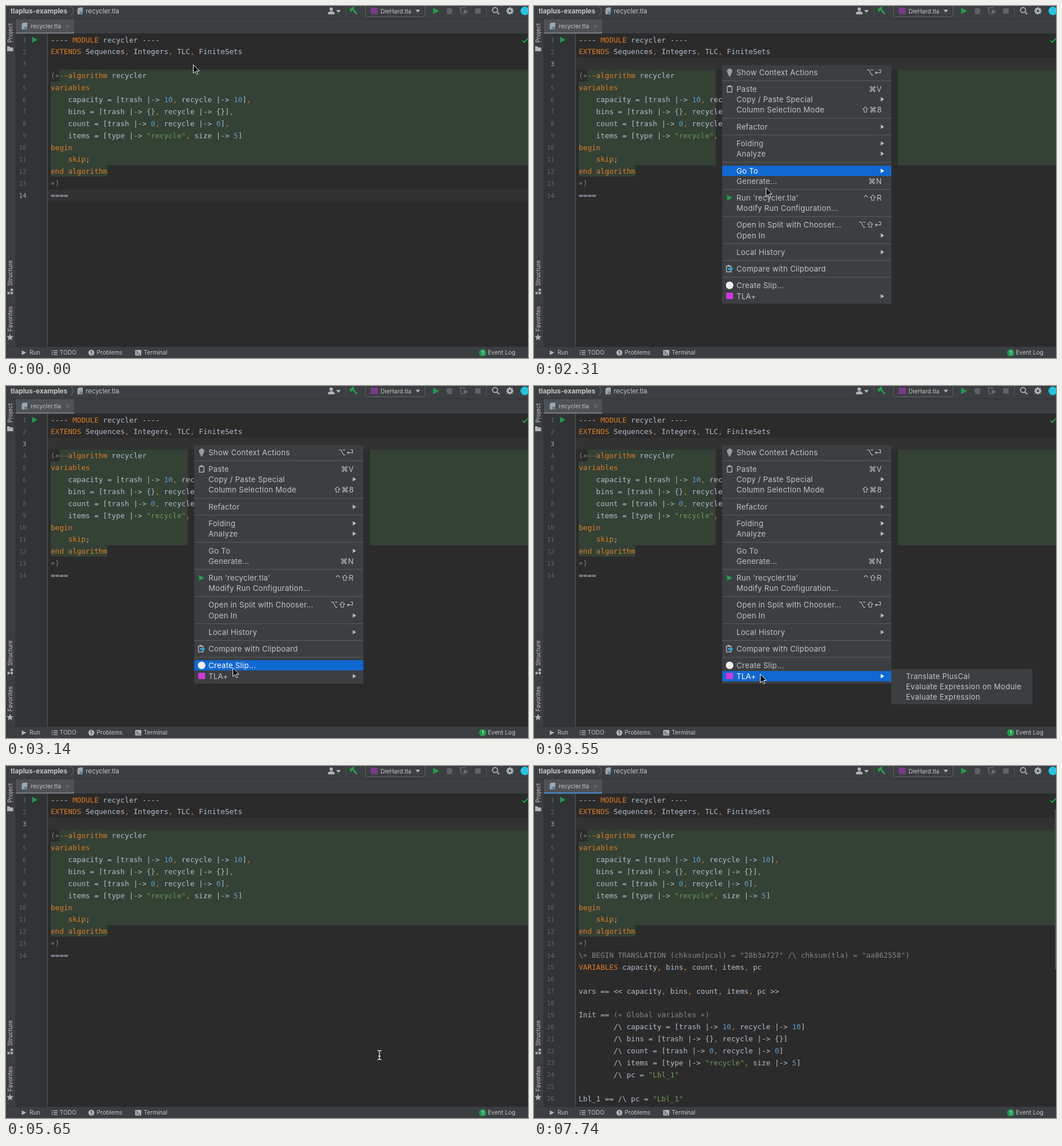
Write an HTML page that moves like this. It is 910 px wide and 615 px high and loops after 7840 ms.

```html
<!DOCTYPE html>
<html lang="en">
<head>
<meta charset="utf-8">
<title>Editor menu</title>
<style>
html, body { margin: 0; width: 100%; height: 100%; overflow: hidden; background: #2b2b2b; }
svg { display: block; width: 910px; height: 615px; }
text { white-space: pre; }
.ui { font: 10.2px Inter, "Open Sans", sans-serif; fill: #c3c5c6; }
.menu { font: 13px Inter, "DejaVu Sans", sans-serif; letter-spacing: .31px; fill: #c3c4c5; }
.code { font: 12.61px "DejaVu Sans Mono", "Noto Sans Mono", monospace; fill: #b0bdcb; }
.number { font: 10.8px "DejaVu Sans Mono", "Noto Sans Mono", monospace; fill: #63676a; text-anchor: end; }
.number.on { fill: #b0b0b0; }
.kw { fill: #db7c28; } .num { fill: #5f9ac6; } .str { fill: #6a9955; } .com { fill: #858585; }
.on { fill: #fff; }
</style>
</head>
<body>
<svg id="stage" viewBox="0 0 910 615"></svg>
<script>
const LOOP = 7840, LINE = 20.88, TOP = 48.5;
const ROW = 18.15, GAP = 11.15;
const MENU = { x: 328, right: 623, top: 103.5, bottom: 520 };
const ICON = '#b1b4b6', GREEN = '#1f9e4c', PANEL = '#3c3f41';

const spec = String.raw`---- MODULE recycler ----
EXTENDS Sequences, Integers, TLC, FiniteSets

(*--algorithm recycler
variables
    capacity = [trash |-> 10, recycle |-> 10],
    bins = [trash |-> {}, recycle |-> {}],
    count = [trash |-> 0, recycle |-> 0],
    items = [type |-> "recycle", size |-> 5]
begin
    skip;
end algorithm
*)`.split('\n');

const translation = String.raw`\* BEGIN TRANSLATION (chksum(pcal) = "28b3a727" /\ chksum(tla) = "aa862558")
VARIABLES capacity, bins, count, items, pc

vars == << capacity, bins, count, items, pc >>

Init == (* Global variables *)
        /\ capacity = [trash |-> 10, recycle |-> 10]
        /\ bins = [trash |-> {}, recycle |-> {}]
        /\ count = [trash |-> 0, recycle |-> 0]
        /\ items = [type |-> "recycle", size |-> 5]
        /\ pc = "Lbl_1"

Lbl_1 == /\ pc = "Lbl_1"`.split('\n');

// '-' separates groups; each item is label | shortcut ('>' opens a submenu) | icon
const menuSpec = ['Show Context Actions|⌥⏎|bulb', '-', 'Paste|⌘V|paste', 'Copy / Paste Special|>',
  'Column Selection Mode|⇧⌘8', '-', 'Refactor|>', '-', 'Folding|>', 'Analyze|>', '-', 'Go To|>',
  'Generate...|⌘N', '-', "Run 'recycler.tla'|⌃⇧R|run", 'Modify Run Configuration...', '-',
  'Open in Split with Chooser...|⌥⇧⏎', 'Open In|>', '-', 'Local History|>', '-',
  'Compare with Clipboard||compare', '-', 'Create Slip...||disc', 'TLA+|>|square'];

// start time, pointer kind, x, y, highlighted menu label
const pointerSteps = [
  [0, 'arrow', 326, 102], [1890, 'arrow', 328, 106], [2100, 'arrow', 360, 171, 'Paste'],
  [2310, 'arrow', 404, 317, 'Go To'], [2510, 'arrow', 403, 378, 'Open in Split with Chooser...'],
  [2720, 'arrow', 400, 435, 'Local History'], [2930, 'arrow', 397, 475],
  [3140, 'arrow', 395, 492, 'Create Slip...'], [3340, 'arrow', 394, 499, 'TLA+'],
  [3550, 'arrow', 394, 503, 'TLA+'], [4180, 'arrow', 426, 503, 'TLA+'], [4390, 'arrow', 518, 508, 'TLA+'],
  [4600, 'arrow', 571, 508, 'TLA+'], [4810, 'arrow', 624, 503, 'TLA+'], [5020, 'arrow', 650, 502, 'TLA+'],
  [5650, 'beam', 651, 505], [6900, 'beam', 652, 505], [7110, 'arrow', 798, 587],
  [7320, 'arrow', 873, 612], [7530, 'none', 0, 0]
];

const escape = s => s.replace(/&/g, '&amp;').replace(/</g, '&lt;').replace(/>/g, '&gt;');
const rect = (x, y, w, h, fill, more = '') =>
  `<rect x="${x}" y="${y}" width="${w}" height="${h}" fill="${fill}" ${more}/>`;
const circle = (x, y, r, fill) => `<circle cx="${x}" cy="${y}" r="${r}" fill="${fill}"/>`;
const shape = (d, fill) => `<path d="${d}" fill="${fill}"/>`;
const stroke = (d, color, width = 1) => `<path d="${d}" fill="none" stroke="${color}" stroke-width="${width}"/>`;
const text = (x, y, s, cls = 'ui', more = '') => `<text x="${x}" y="${y}" class="${cls}" ${more}>${escape(s)}</text>`;
const group = (id, body) => `<g id="${id}">${body}</g>`;
const play = (x, y, h, fill) => shape(`M${x} ${y - h}l${h * 1.8} ${h}l${-h * 1.8} ${h}z`, fill);
const drop = (x, y) => shape(`M${x - 4} ${y - 2}h8l-4 5z`, ICON);

function highlight(line) {
  const token = /(\\\*.*|\(\*(?: .*\*\))?|\*\))|("[^"]*")|(--algorithm|end algorithm|\b(?:MODULE|EXTENDS|VARIABLES|variables|begin|skip)\b|,)|(\b\d+\b)/g;
  const kinds = ['com', 'str', 'kw', 'num'];
  let html = '', last = 0;
  for (const m of line.matchAll(token)) {
    const kind = kinds[m.slice(1).findIndex(Boolean)];
    html += escape(line.slice(last, m.index)) + `<tspan class="${kind}">${escape(m[0])}</tspan>`;
    last = m.index + m[0].length;
  }
  // the editor font centres its asterisk on the line
  return (html + escape(line.slice(last))).replace(/\*/g, '∗');
}

const lineY = n => TOP + LINE * (n - 1);
const codeLine = (line, n) =>
  `<text x="78" y="${lineY(n) + 15.1}" class="code">${highlight(line)}</text>` +
  text(35.5, lineY(n) + 14.6, String(n), 'number', `id="n${n}"`);
const codeBlock = (lines, first) => lines.map((line, i) => codeLine(line, first + i)).join('');

function fileIcon(x, y) {
  return shape(`M${x + 4} ${y}h5.5v12h-9.5v-8z`, '#9aa7b0') + shape(`M${x} ${y + 3}l3-3v3z`, '#c4ccd1') +
    rect(x + 4, y + 7, 5.5, 5, '#64808f');
}

function gear(x, y) {
  let teeth = '';
  for (let i = 0; i < 8; i++) teeth += rect(x - 1.4, y - 6.3, 2.8, 3, ICON, `transform="rotate(${i * 45} ${x} ${y})"`);
  return teeth + `<circle cx="${x}" cy="${y}" r="3.3" fill="none" stroke="${ICON}" stroke-width="2.6"/>`;
}

function star(x, y, r) {
  const points = Array.from({ length: 10 }, (_, i) => {
    const a = i * Math.PI / 5 - Math.PI / 2, d = i % 2 ? r * .42 : r;
    return `${x + d * Math.cos(a)},${y + d * Math.sin(a)}`;
  });
  return `<polygon points="${points.join(' ')}" fill="${ICON}"/>`;
}

function bug(x, y) {
  return stroke(`M${x - 5.5} ${y}h11M${x - 5} ${y - 4}l3 2M${x + 5} ${y - 4}l-3 2M${x - 5} ${y + 5}l3-2M${x + 5} ${y + 5}l-3-2`, '#686b6d', 1.3) +
    `<ellipse cx="${x}" cy="${y + .5}" rx="3.8" ry="5.5" fill="#686b6d"/>` + stroke(`M${x - 2} ${y - 1}h4m-4 3h4`, PANEL);
}

function toolbar() {
  return rect(0, 0, 910, 48, PANEL) + rect(0, 22, 910, 1, '#313335') +
    text(8, 12.8, 'tlaplus-examples', 'ui', 'style="font-size:11.7px;font-weight:700"') +
    stroke('M114 1l4 7.5-4 7.5', '#777a7c') + fileIcon(124.5, 2.5) +
    text(139, 12.7, 'recycler.tla', 'ui', 'style="font-size:11.3px"') +
    circle(567, 5.5, 3, ICON) + shape('M561 14.5v-2q1-3 6-3.5q5 .5 6 3.5v2z', ICON) + drop(579.5, 9) +
    rect(592, 0, 1, 18, '#515456') +
    `<g transform="rotate(-43 607 9)">${rect(605.7, 3, 2.8, 13, GREEN)}${rect(602, 1.5, 9, 4.5, GREEN)}</g>` +
    rect(626.5, -5, 104, 23.5, PANEL, 'rx="3" stroke="#5f6264"') +
    rect(636, 3, 12, 11, '#7a3a8c') + text(653, 12.7, 'DieHard.tla') + drop(718, 8.5) +
    play(744.5, 8.5, 5.8, GREEN) + bug(773, 8.5) +
    stroke('M801 3h-8.5v6q1 4 5 5.5', '#686b6d', 1.6) + play(798, 10, 4.5, '#686b6d') +
    rect(818, 4, 9.5, 9.5, '#606365') + rect(837, 0, 1, 18, '#515456') +
    `<circle cx="852.5" cy="7" r="4.4" fill="none" stroke="${ICON}" stroke-width="1.7"/>` +
    stroke('M856 10.5l4 4', ICON, 2) + gear(878.5, 8.5) + circle(904.5, 8.5, 7.5, '#20c5e5') +
    rect(17, 23, 101.5, 25, '#4e5254') + fileIcon(27.5, 29) + text(43, 38.8, 'recycler.tla') +
    stroke('M104.5 32.5l5.5 5.5m0-5.5l-5.5 5.5', '#7f8385') +
    rect(17, 46, 101.5, 2.3, '#747a80', 'id="tabLine"');
}

function sideBar() {
  const label = (y, s) => text(0, 0, s, 'ui', `text-anchor="middle" transform="translate(10.7 ${y}) rotate(-90)"`);
  return rect(0, 23, 16, 573, PANEL) + rect(16, 23, 1, 573, '#323232') +
    label(47, 'Project') + shape('M2 70.5h4l1.5 2h5v6.5h-10.5z', ICON) +
    label(466.5, 'Structure') + rect(2.5, 499.5, 4, 4, ICON) + rect(8, 499.5, 4, 4, ICON) + rect(8, 494, 4, 4, ICON) +
    label(546.5, 'Favorites') + star(7, 579, 6.3);
}

function statusBar() {
  return rect(0, 595, 910, 20, PANEL) + rect(0, 595, 910, 1, '#323435') +
    play(27.5, 605.8, 4.3, ICON) + text(41, 609.3, 'Run') +
    stroke('M83 602.5h7m-7 3.3h7m-7 3.3h7M79.5 602.5h2m-2 3.3h2m-2 3.3h2', ICON, 1.4) + text(93.5, 609.3, 'TODO') +
    circle(148.8, 605.8, 5.2, ICON) + stroke('M148.8 602.5v4m0 1.2v1.6', PANEL, 1.5) + text(158, 609.3, 'Problems') +
    rect(225.3, 601, 10.6, 9.5, ICON) + stroke('M227.5 603.3l2.5 2.4-2.5 2.4m3.5 0h3', PANEL, 1.2) + text(240, 609.3, 'Terminal') +
    circle(831, 605.8, 6.2, GREEN) + text(831, 609.2, '1', 'on', 'style="font:9px Inter,sans-serif" text-anchor="middle"') +
    text(840, 609.3, 'Event Log');
}

const clipboard = (x, y) => stroke(`M${x} ${y - 4.5}h8v10h-8z`, ICON, 1.4) + rect(x + 2, y - 6.5, 4, 3, ICON);
const menuIcons = {
  bulb: y => circle(341, y - 2, 4.7, '#9a9da0') + rect(338.5, y + 1, 5, 4, '#9a9da0') + rect(339, y + 5.5, 4, 1.3, '#9a9da0'),
  paste: y => clipboard(337, y),
  run: y => play(336.5, y, 5.3, GREEN),
  compare: y => clipboard(335.5, y) + shape(`M338 ${y - 1}h4v-3l5.5 4.5-5.5 4.5v-3h-4z`, '#35a4d8'),
  disc: y => circle(341, y, 6.6, '#f0f0f0'),
  square: y => rect(335, y - 6, 12, 11, '#cf37dc')
};

const rows = [];
function buildMenu() {
  const { x, right, top, bottom } = MENU;
  let offset = 115.88 - ROW, lines = '', items = '';
  for (const entry of menuSpec) {
    if (entry === '-') {
      lines += rect(x, offset + 14.1, right - x, 1.2, '#56595b');
      offset += GAP;
      continue;
    }
    offset += ROW;
    const y = Math.round(offset);
    const [label, key, icon] = entry.split('|');
    rows.push({ label, y });
    const side = key === '>' ? shape(`M604.5 ${y - 3.7}l6 3.7-6 3.7z`, 'currentColor')
      : key ? text(606.3, y + 5, key, 'menu', 'text-anchor="end"') : '';
    items += `<g class="row" color="#b8babb">${text(353, y + 5, label, 'menu')}${side}${icon ? menuIcons[icon](y) : ''}</g>`;
  }
  return rect(x, top, right - x, bottom - top, PANEL) + lines +
    rect(x, 0, right - x, 18, '#1068d1', 'id="hover"') + items;
}

function buildSubmenu() {
  const labels = ['Translate PlusCal', 'Evaluate Expression on Module', 'Evaluate Expression'];
  return rect(623, 494.5, 246, 61.5, PANEL) + rect(623, 498, 246, 18, '#1068d1', 'id="subHover"') +
    labels.map((s, i) => text(648.5, 512 + 18 * i, s, 'menu', `id="sub${i}"`)).join('');
}

const block = '#344135';
const stage = document.getElementById('stage');
stage.innerHTML =
  rect(0, 0, 910, 615, '#2b2b2b') + rect(17, 48, 55, 548, '#313335') +
  rect(73, 0, 837, LINE - 1, '#323232', 'id="currentLine"') +
  rect(93.2, lineY(4), 816.8, LINE + .1, block) + rect(78, lineY(5), 832, LINE * 7, block) +
  rect(78, lineY(12), 98.7, LINE - 1, block) +
  rect(317, lineY(4), 317, LINE * 8, '#2b2c2b', 'id="shade"') +
  rect(72, 48, 1, 548, '#555759') + play(45.5, 59, 5.2, GREEN) +
  codeBlock(spec, 1) + group('ending', codeLine('====', 14)) +
  group('translated', codeBlock(translation, 14).replace('id="n14"', '') + rect(908, 76, 2, 279, '#505152')) +
  rect(78, 92, 1.7, 17, '#bbbbbb', 'id="caret"') +
  group('check', stroke('M900.5 60.5l3 3 6-6.5', GREEN, 2.2)) +
  group('eye', stroke('M900 60.5q5-6 10 0q-5 6-10 0z', ICON) + circle(905, 60.5, 1.6, ICON)) +
  toolbar() + sideBar() + statusBar() +
  group('menu', buildMenu()) + group('submenu', buildSubmenu()) +
  group('arrow', '<path d="M.5 .5v15l3.5-3.3 2.4 5.5 2.3-1-2.4-5.3h4.7z" fill="#080808" stroke="#f2f2f2"/>') +
  group('beam', stroke('M-3.5-8q3 0 3.5 1.5q.5-1.5 3.5-1.5M0-7v14M-3.5 8q3 0 3.5-1.5q.5 1.5 3.5 1.5M-2 2h4', '#e6e6e6', 1.4));

const part = id => document.getElementById(id);
const show = (id, on) => part(id).setAttribute('display', on ? 'inline' : 'none');
const rowNodes = [...stage.querySelectorAll('.row')];

function render(t) {
  const within = (from, to = LOOP) => t >= from && t < to;
  const [, kind, x, y, active] = pointerSteps.findLast(step => step[0] <= t);
  const open = within(1260, 5650), translated = t >= 5850, picking = within(5020, 5650);

  for (const id of ['menu', 'shade']) show(id, open);
  show('submenu', within(3550, 5650));
  show('subHover', picking);
  part('sub0').style.fill = picking ? '#fff' : '';
  show('hover', active);
  rows.forEach((row, i) => {
    const on = row.label === active;
    if (on) part('hover').setAttribute('y', row.y - 9);
    rowNodes[i].setAttribute('color', on ? '#fff' : '#b8babb');
    rowNodes[i].querySelectorAll('text').forEach(node => { node.style.fill = on ? '#fff' : ''; });
  });

  const current = t < 1260 ? 14 : 3;
  part('currentLine').setAttribute('y', lineY(current) + .5);
  for (const n of [3, 14]) part('n' + n).setAttribute('class', n === current ? 'number on' : 'number');
  show('ending', !translated);
  show('translated', translated);
  part('tabLine').setAttribute('fill', translated ? '#4a88c7' : '#747a80');
  show('caret', within(5850, 6690) || within(7320, 7740));
  const analysing = within(6060, 6690);
  show('eye', analysing);
  show('check', !analysing);

  for (const id of ['arrow', 'beam']) {
    show(id, id === kind);
    part(id).setAttribute('transform', `translate(${x} ${y})`);
  }
}

const start = performance.now();
function frame() {
  render((performance.now() - start) % LOOP);
  requestAnimationFrame(frame);
}
frame();
</script>
</body>
</html>
```
